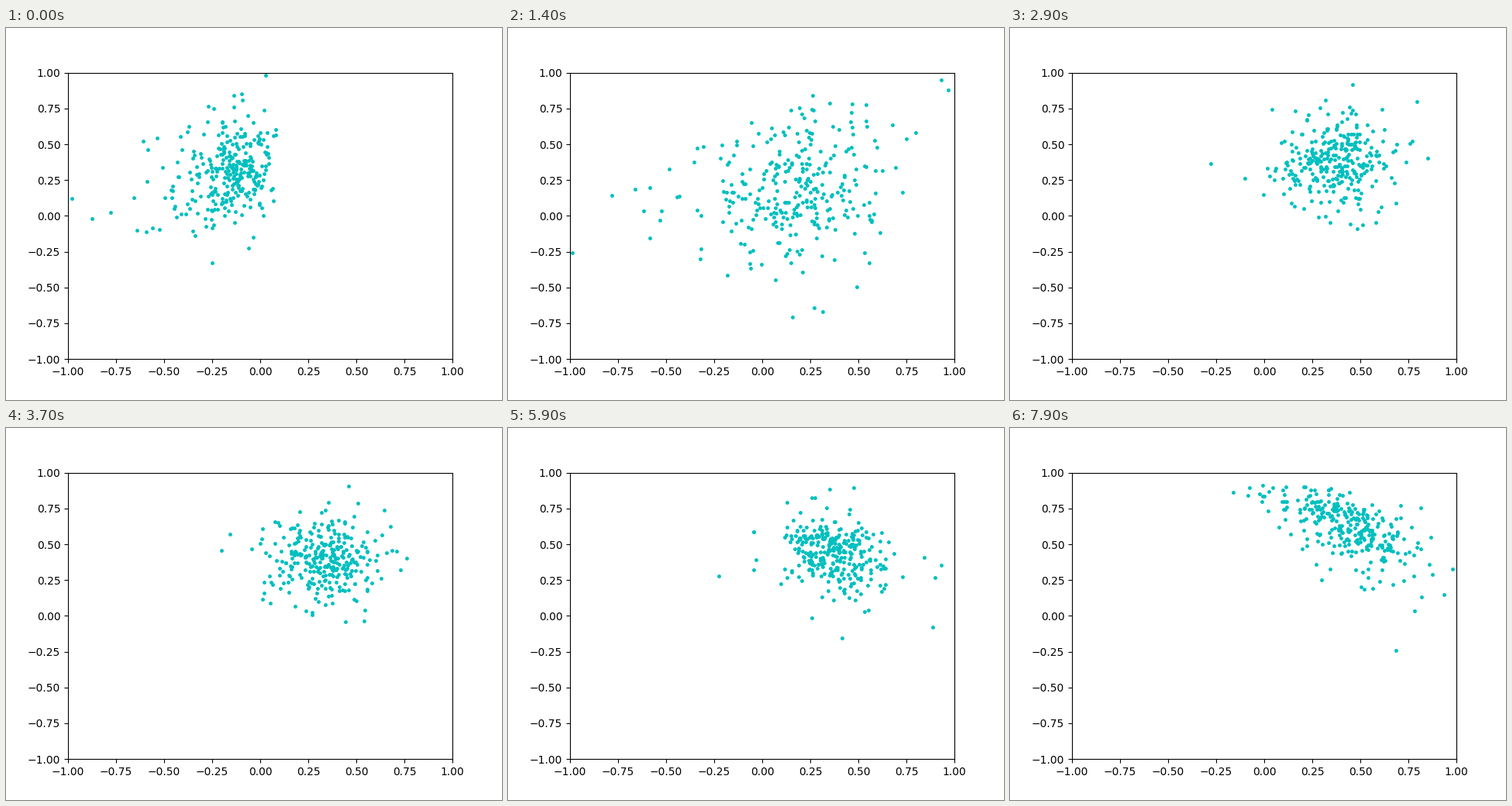
A matplotlib script for the animation above (8000 ms loop, 640 by 480 pixels).

```python
import numpy as np
import matplotlib.pyplot as plt
from matplotlib.animation import FuncAnimation

FRAMES, STEP_MS, COUNT = 80, 100, 300

# way points of the cloud's centre
STEPS = [0, 10, 20, 29, 50, 71, 79]
CENTRE_X = [-.17, .13, .29, .38, .30, .46, .44]
CENTRE_Y = [.29, .20, .27, .38, .45, .40, .62]


def skewed(z, k):
    return (z - k * (z * z - 1)) / np.sqrt(1 + 2 * k * k)


def sample(step):
    """Fresh population drawn from the distribution at this step."""
    progress = step / (FRAMES - 1)
    burst = step / 5.5 * np.exp(1 - step / 5.5)  # quick spread, slow settling
    early = np.exp(-step / 15)
    late = progress ** 6
    rho = .25 - .85 * progress ** 2

    u, v = np.random.default_rng(step).standard_t(12, (2, COUNT)) * .91
    w = rho * u + np.sqrt(1 - rho * rho) * v
    spread = .145 + .235 * burst
    x = (np.interp(step, STEPS, CENTRE_X)
         + (spread + .02 * early + .03 * late) * skewed(u, .18 * early))
    y = (np.interp(step, STEPS, CENTRE_Y)
         + (spread + .06 * early + .02 * late) * skewed(w, .15 * late))
    return x, y


fig, ax = plt.subplots(figsize=(6.4, 4.8), dpi=100)
ax.set_xlim(-1, 1)
ax.set_ylim(-1, 1)
dots, = ax.plot([], [], "c.", markersize=5)


def update(step):
    dots.set_data(*sample(step))
    return dots,


anim = FuncAnimation(fig, update, frames=FRAMES, interval=STEP_MS,
                     init_func=lambda: update(0), repeat=True, repeat_delay=0)
plt.show()
```
